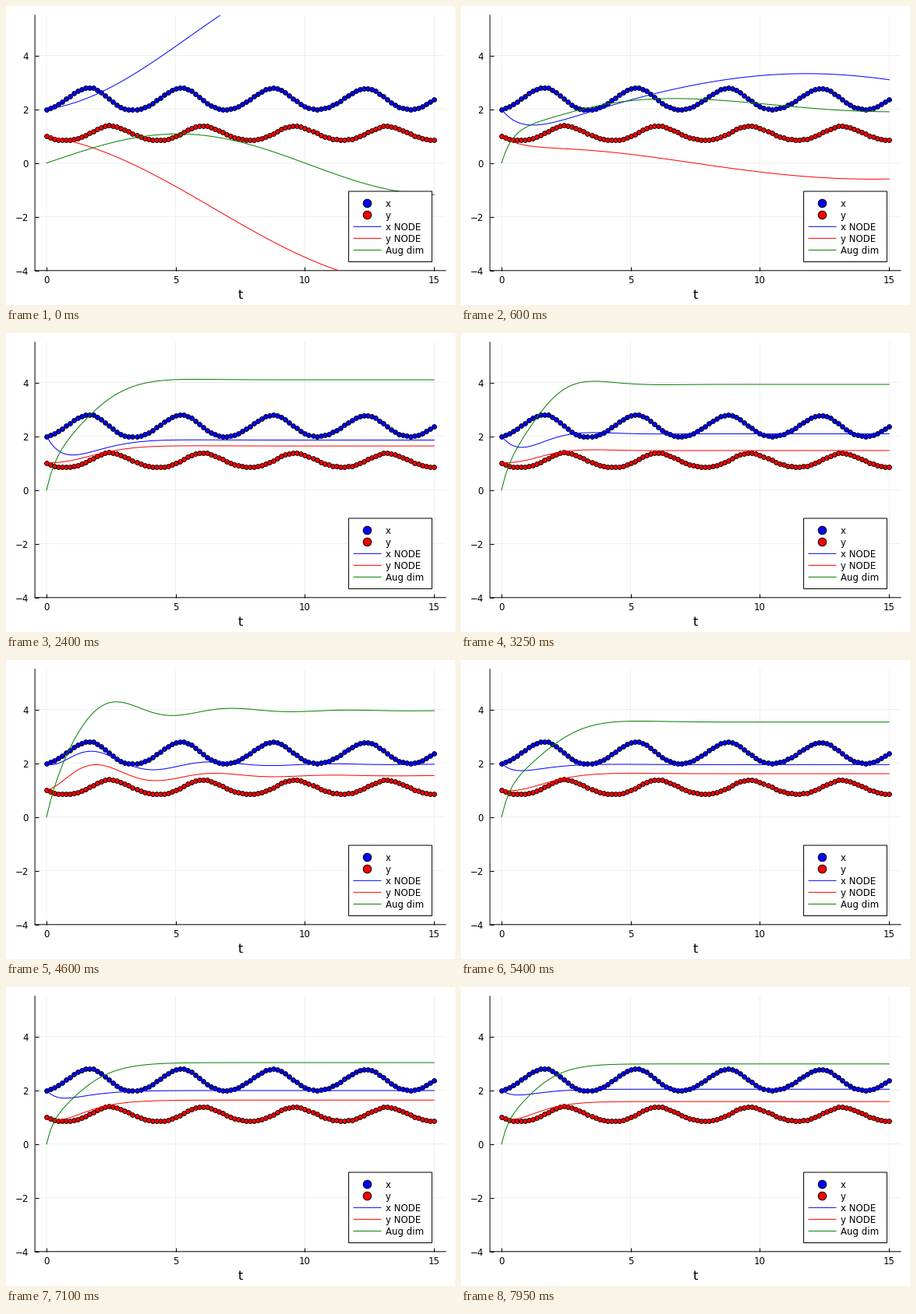
Animation, 576 px wide and 384 px high, one loop 8 s. Source, as a matplotlib script:

```python
import numpy as np
import matplotlib.pyplot as plt
from matplotlib.animation import FuncAnimation
from matplotlib.patches import Rectangle

W, H, DPI = 576, 384, 96
PX = 72 / DPI                      # points per pixel
FRAMES, STEP = 160, 50
T = np.linspace(0, 15, 100)
START = np.array([2.0, 1.0, 0.0])
COLORS = ("blue", "red", "green")
AUG_SLOPE = 4.3

plt.rcParams["font.family"] = "DejaVu Sans"
plt.rcParams["path.snap"] = False

# Stages of training: time in ms, damping, frequency, fast rate, wave offset,
# resting levels of x, y and aug, starting slopes of x and y
STAGES = np.array([
    (1250, .70, .00, 2.0, 0, 1.83, .85, 3.05, -1.8, -.85),
    (2400, .90, .65, 2.0, 0, 1.86, 1.64, 4.10, -1.8, .1),
    (3250, .85, 1.14, 2.0, 0, 2.09, 1.47, 3.93, -1.2, .1),
    (4600, .33, 1.37, 1.5, -.75, 1.96, 1.54, 3.96, -.5, .2),
    (6250, 1.35, .00, 3.0, 0, 1.94, 1.69, 3.08, -1.5, -.5),
    (7950, 1.40, .50, 3.0, 0, 2.04, 1.58, 2.98, -.7, -.4),
]).T
FIRST = STAGES[0, 0]


def untrained():
    return np.array([
        4.66 - 2.66 * np.cos(T / 4) + .55 * np.sin(T / 4),
        -1.7 + 2.7 * np.cos(T / 5) - .75 * np.sin(T / 5),
        1.04 * np.exp(.008 * T) * np.sin(np.pi * T / 10),
    ])


def settling(ms):
    """A fast decay plus a damped wave, with set start, slope and level."""
    k, w, m, offset, *rest = (np.interp(ms, STAGES[0], row) for row in STAGES[1:])
    curves = []
    for start, level, slope in zip(START, rest[:3], rest[3:] + [AUG_SLOPE]):
        fast = start - level - offset
        push = slope + k * offset + m * fast
        wave = offset * np.cos(w * T) + push * T * np.sinc(w * T / np.pi)
        curves.append(level + fast * np.exp(-m * T) + np.exp(-k * T) * wave)
    return np.array(curves)


def curves_at(ms):
    left = max(0, 1 - ms / FIRST) ** 2
    return left * untrained() + (1 - left) * settling(ms)


def predator_prey(u):
    x, y = u
    return np.array([x * (1.244 - 1.131 * y - .005 * (x - 2.37)),
                     y * (1.06 * x - 2.512)])


def solve(u, substeps=8):
    h = (T[1] - T[0]) / substeps
    out = [u]
    for _ in T[1:]:
        for _ in range(substeps):
            a = predator_prey(u)
            b = predator_prey(u + h / 2 * a)
            c = predator_prey(u + h / 2 * b)
            d = predator_prey(u + h * c)
            u = u + h / 6 * (a + 2 * b + 2 * c + d)
        out.append(u)
    return np.array(out).T


fig = plt.figure(figsize=(W / DPI, H / DPI), dpi=DPI, facecolor="white")

# Plot area
ax = fig.add_axes([37.1 / W, 44.2 / H, 527 / W, 328 / H])
ax.set(xlim=(-.45, 15.45), ylim=(-4, 5.5),
       xticks=(0, 5, 10, 15), yticks=(-4, -2, 0, 2, 4))
ax.spines[["top", "right"]].set_visible(False)
ax.spines[["left", "bottom"]].set_linewidth(PX)
ax.tick_params(direction="in", length=5 * PX, width=PX, labelsize=11.75 * PX)
ax.tick_params(axis="x", pad=6.5 * PX)
ax.tick_params(axis="y", pad=8 * PX)
ax.grid(color="black", alpha=.1, linewidth=.6 * PX)
ax.set_axisbelow(True)

for z, (data, color) in enumerate(zip(solve(START[:2]), COLORS)):
    ax.plot(T, data, "o", color=color, ms=5.8 * PX, mec="black",
            mew=.9 * PX, zorder=3 + z)
lines = [ax.plot([], [], color=c, lw=PX, zorder=5 + z)[0]
         for z, c in enumerate(COLORS)]

# Axis title and legend, in pixels from the top left
top = fig.add_axes([0, 0, 1, 1], xlim=(0, W), ylim=(H, 0))
top.axis("off")
top.text(300.5, 376, "t", size=16.1 * PX, ha="center", va="baseline")
top.add_patch(Rectangle((439.6, 238), 106.8, 90.5, fc="white", ec="black", lw=PX))
entries = (("x", "blue", True), ("y", "red", True), ("x NODE", "blue", False),
           ("y NODE", "red", False), ("Aug dim", "green", False))
for row, (label, color, dot) in enumerate(entries):
    y = 253.2 + 15.05 * row
    if dot:
        top.plot(463, y, "o", color=color, ms=10.5 * PX, mec="black", mew=PX)
    else:
        top.plot([446, 481], [y, y], color=color, lw=PX)
    top.text(487, y + 4.5, label, size=11.75 * PX, va="baseline")


def update(frame):
    for line, values in zip(lines, curves_at(frame * STEP)):
        line.set_data(T, values)
    return lines


anim = FuncAnimation(fig, update, frames=FRAMES, interval=STEP,
                     repeat=True, repeat_delay=0, blit=False)
plt.show()
```
